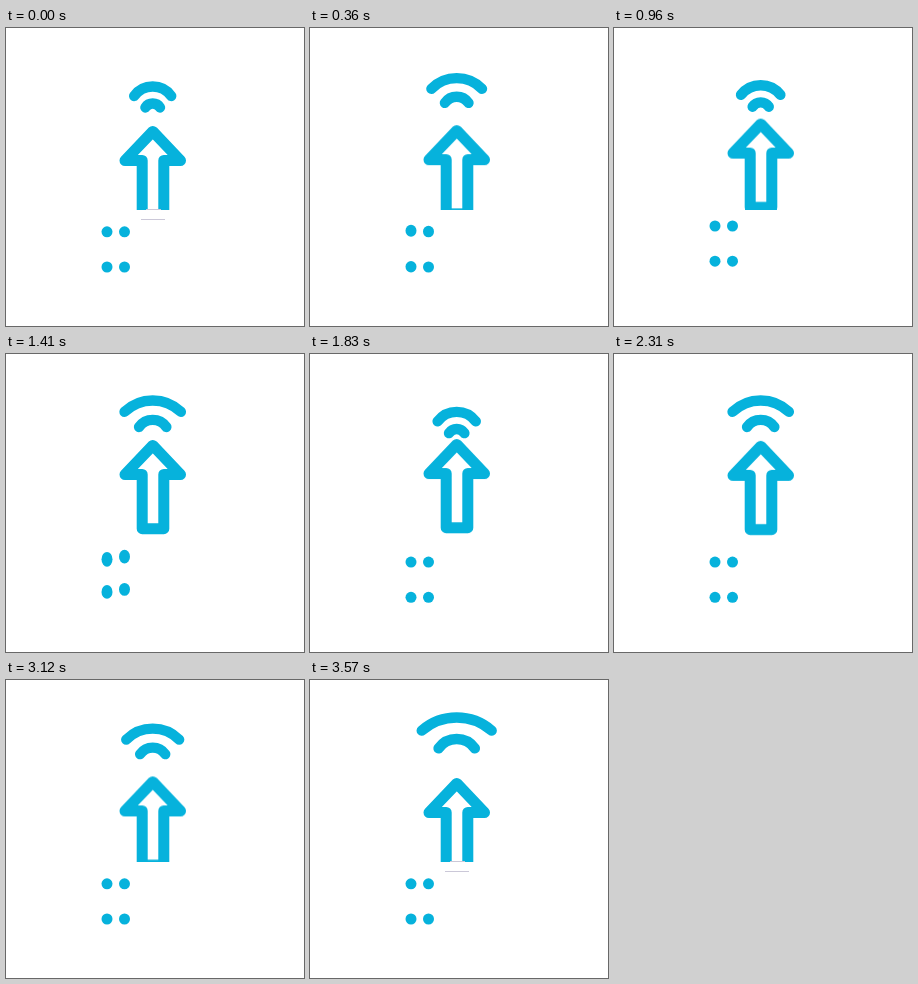
Write an HTML page that moves like this. It is 298 by 298 pixels and loops after 3.6 s.

```html
<!DOCTYPE html>
<html lang="en">
<head>
<meta charset="utf-8">
<title>Upload signal</title>
<style>
  html, body { margin: 0; width: 100%; height: 100%; overflow: hidden; background: #fff; }
  svg { display: block; width: 100vw; height: 100vh; }

  .line { fill: none; stroke: #06b2dc; stroke-linecap: round; stroke-linejoin: round; }

  /* Signal arcs travel outwards, each one ending where the next began */
  .wave { stroke-width: 10.4; animation: 900ms linear infinite; }
  .inner { animation-name: inner; }
  .outer { animation-name: outer; }
  @keyframes inner {
    from { d: path("M139.4 79.5 A8.7 8.7 0 0 1 154 79.5"); }
    to   { d: path("M128.2 68 A22.8 22.8 0 0 1 165.2 68"); }
  }
  @keyframes outer {
    from { d: path("M128.2 68 A22.8 22.8 0 0 1 165.2 68"); }
    to   { d: path("M111.2 50 A54.3 54.3 0 0 1 182.2 50"); }
  }

  /* Arrow rises out of the slot and sinks back */
  .arrow { stroke-width: 11; animation: rise 1800ms cubic-bezier(.5, 0, .5, 1) infinite alternate; }
  @keyframes rise { to { transform: translateY(-13px); } }

  .slot { fill: #cbc8d8; animation: slot 3600ms step-end infinite; }
  @keyframes slot {
    0%, 96% { opacity: 1; }
    2% { opacity: 0; }
  }

  /* Lights bob one after another, stretching while they move */
  .dots { fill: #06b2dc; }
  .dots circle {
    transform-box: fill-box;
    transform-origin: center;
    animation: bob 3600ms ease-in-out infinite, stretch 3600ms linear infinite;
    animation-delay: calc(var(--lag, 0) * 60ms - 3600ms);
  }
  @keyframes bob {
    0%, 6.7%, 83.3%, 100% { translate: 0 0; }
    18.3%, 32.5% { translate: 0 -5.8px; }
    43%, 72.8% { translate: 0 4.3px; }
  }
  @keyframes stretch {
    0%, 6.7%, 18.3%, 33%, 43%, 100% { scale: 1 1; }
    15% { scale: 1 1.25; }
    39.2% { scale: 1 1.35; }
  }
</style>
</head>
<body>
<svg viewBox="0 0 298 298">
  <clipPath id="above"><rect width="298" height="181.5"/></clipPath>

  <path class="line wave outer" d="M128.2 68 A22.8 22.8 0 0 1 165.2 68"/>
  <path class="line wave inner" d="M139.4 79.5 A8.7 8.7 0 0 1 154 79.5"/>

  <g clip-path="url(#above)">
    <path class="line arrow" d="M146.8 103.4 L174.5 132.5 H157.8 V186.7 H136.2 V132.5 H119 Z"/>
  </g>
  <g class="slot">
    <rect x="140" y="181" width="15" height="1"/>
    <rect x="135" y="191" width="24" height="1"/>
  </g>

  <g class="dots">
    <circle cx="101" cy="203.8" r="5.5"/>
    <circle cx="118.5" cy="203.8" r="5.5" style="--lag: 1"/>
    <circle cx="101" cy="239" r="5.5" style="--lag: 1"/>
    <circle cx="118.5" cy="239" r="5.5" style="--lag: 2"/>
  </g>
</svg>
</body>
</html>
```
